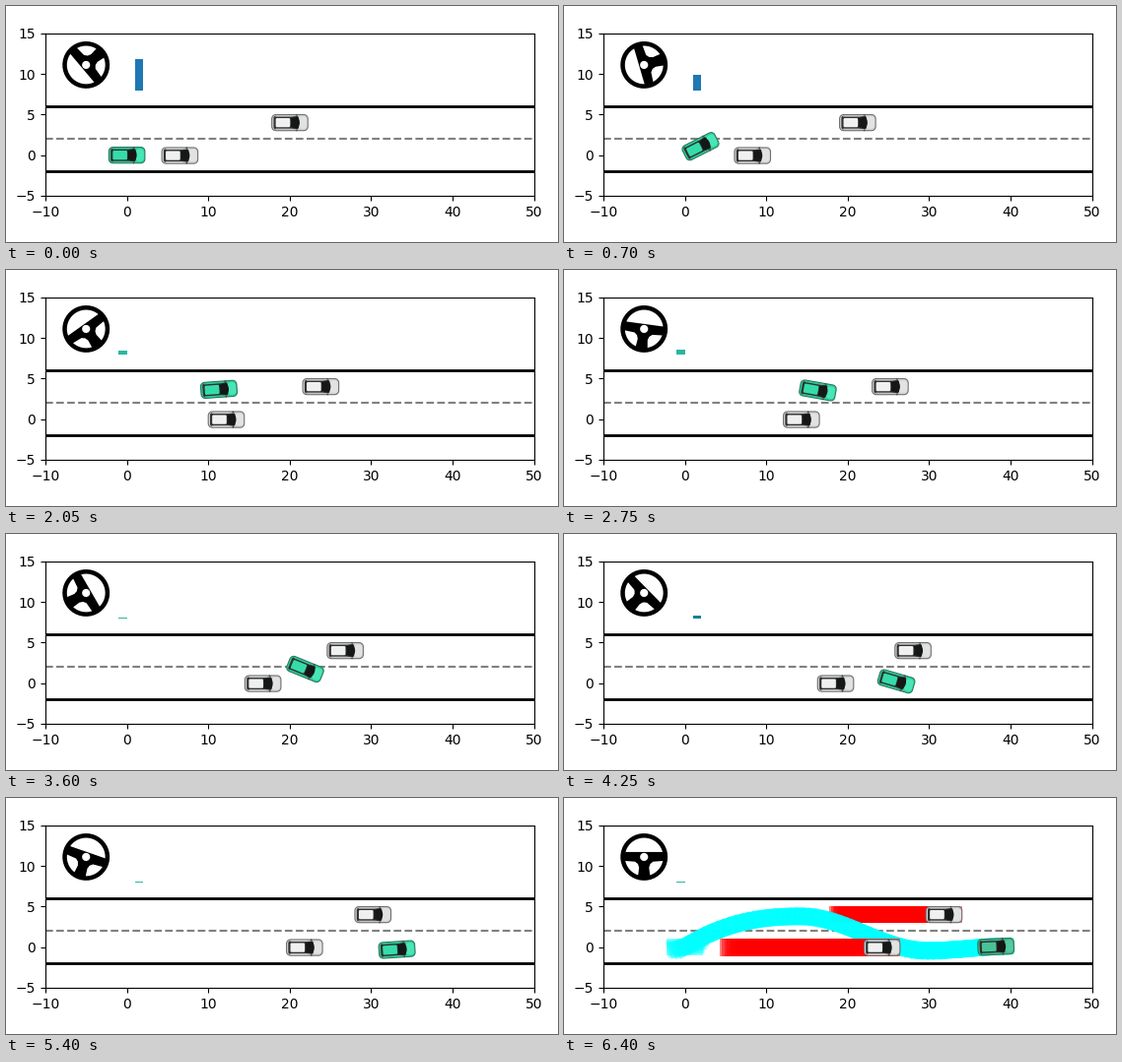
A matplotlib script for the animation above (7900 ms loop, 560 by 240 pixels).

```python
import numpy as np
import matplotlib.pyplot as plt
from matplotlib.animation import FuncAnimation
from matplotlib.patches import Polygon, Rectangle

W, H, TICK, LOOP = 560, 240, 50, 7900
LENGTH, WIDTH = 4.5, 2.1
LAST = 59          # last moving step; the next one adds the trails
RAMP = 12          # steps spent speeding up

# Steps are 100 ms long, some of them 50 ms longer.
LONG_STEPS = (0, 3, 14, 28, 39, 47, 53, 57)
STARTS = [100 * i + 50 * sum(k < i for k in LONG_STEPS) for i in range(LAST + 2)]


def ease(u):
    return .5 - .5 * np.cos(np.pi * np.clip(u, 0, 1))


def travel(step):
    """Speed up along a parabola, then slow down evenly."""
    u = min(step / RAMP, 1)
    cruise = max(step - RAMP, 0)
    return 9.22 * (u**2 - u**3 / 3) + .745 * cruise - .00135 * cruise**2


def route(x):
    """Climb into the upper lane, sink back and settle."""
    if x < 14:
        return 3.75 * (1 - (1 - x / 14)**2.3)
    return 3.75 - 4.15 * ease((x - 14) / 16) + .5 * ease((x - 30) / 10)


def steering(step):
    return 130 - 190 * min(step / 34, 1)**1.2 + 60 * max(step - 34, 0) / 25


def acceleration(step):
    if step < RAMP:
        return 3.87 * (1 - step / RAMP)
    return np.interp(step, (RAMP, 26, 36, 45, 52), (-.3, -.6, 0, .6, 0))


def ego_pose(step):
    x = travel(step)
    slope = (route(x + .01) - route(x - .01)) / .02
    return x, route(x), np.arctan(slope) * min(step / 4, 1)


def lower_pose(step):
    return 6.5 + .3 * step, -.05, 0


def upper_pose(step):
    return 20 + .2 * step, 4, 0


def place(points, pose):
    x, y, angle = pose
    c, s = np.cos(angle), np.sin(angle)
    return np.asarray(points) @ np.array([[c, s], [-s, c]]) + (x, y)


def arc(a, b, r=1.0, center=(0, 0), n=40):
    t = np.radians(np.linspace(a, b, n))
    return np.column_stack([center[0] + r * np.cos(t), center[1] + r * np.sin(t)])


def rounded(x0, x1, half, r):
    corners = ((x1 - r, half - r), (x0 + r, half - r),
               (x0 + r, r - half), (x1 - r, r - half))
    return np.vstack([arc(90 * k, 90 * k + 90, r, c, 8) for k, c in enumerate(corners)])


fig = plt.figure(figsize=(W / 100, H / 100), dpi=100)
ax = fig.add_axes([39.9 / W, 47 / H, 495.9 / W, 165.3 / H])
ax.set(xlim=(-10, 50), ylim=(-5, 15), xticks=range(-10, 51, 10), yticks=range(-5, 16, 5))
for edge in (-2, 6):
    ax.plot([-10, 50], [edge, edge], color="black", lw=2, zorder=1)
ax.plot([-10, 50], [2, 2], color="gray", ls="--", zorder=1)

moving = []


def shape(points, color, pose=(0, 0, 0), edge="none", lw=0, alpha=None, z=3):
    patch = Polygon(place(points, pose), closed=True, fc=color, ec=edge,
                    lw=lw, alpha=alpha, zorder=z)
    moving.append(ax.add_patch(patch))


def draw_car(pose, body, roof, hood, edge):
    mirror = np.array([(.65, .85), (.85, 1.08), (1, .85)])
    pillar = np.array([(-1.8, .73), (.2, .73), (.8, .8), (.8, .87), (-1.6, .87)])
    shape(rounded(-2.2, 2.22, .98, .5), body, pose, edge, .8)
    shape(rounded(1.1, 2.1, .75, .4), hood, pose)
    shape(rounded(-1.98, 1.1, .82, .25), "#2e3130", pose)
    for side in ((1, 1), (1, -1)):
        shape(mirror * side, "#444444", pose)
        shape(pillar * side, body, pose)
    shape(rounded(-1.72, .05, .56, .15), roof, pose)
    glass = np.vstack([arc(-40, 40, 1.15, (.07, 0)), [(.1, .54), (.18, 0), (.1, -.54)]])
    shape(glass, "#151817", pose)


def draw_wheel(degrees):
    pose = (-5, 11.1, np.radians(degrees))
    size = 2.9
    lobe = np.vstack([arc(192, 252, .81), [(-.21, -.45), (-.26, -.3), (-.38, -.2)]])
    shape(size * arc(0, 360), "black", pose)
    shape(size * arc(15, 165, .81), "white", pose)
    shape(size * lobe, "white", pose)
    shape(size * lobe * (-1, 1), "white", pose)
    shape(size * arc(0, 360, .17), "white", pose)


def draw_pedal(accel):
    """Throttle grows on the right, brake on the left."""
    x = 1 if accel > 0 else -1
    color = "#1f77b4" if accel > 1 else "#1a8093" if accel > .1 else "#2cb5a0"
    height = max(abs(accel), .12)
    moving.append(ax.add_patch(Rectangle((x, 8), 1, height, fc=color, lw=0)))


def draw_trails():
    half_l, half_w = LENGTH / 2, WIDTH / 2
    box = [(-half_l, -half_w), (half_l, -half_w), (half_l, half_w), (-half_l, half_w)]
    for step in range(LAST + 1):
        for pose, color in ((lower_pose(step), "red"), (upper_pose(step), "red"),
                            (ego_pose(step), "cyan")):
            shape(box, color, pose, alpha=.5, z=2)


def update(frame):
    while moving:
        moving.pop().remove()
    index = np.searchsorted(STARTS, frame * TICK, side="right") - 1
    step = min(index, LAST)
    finished = index > LAST
    draw_wheel(steering(step))
    draw_pedal(-.01 if finished else acceleration(step))
    if finished:
        draw_trails()
    for pose in (lower_pose(step), upper_pose(step)):
        draw_car(pose, "#d4d4d4", "#f0f0f0", "#e2e2e2", "#707070")
    green = ("#3fb58a", "#48c398", "#55c9a0") if finished else ("#2fcf9c", "#35dcaa", "#48e6b6")
    draw_car(ego_pose(step), *green, "#2a7a60")
    return moving


anim = FuncAnimation(fig, update, frames=LOOP // TICK, interval=TICK,
                     init_func=lambda: [], repeat=True, repeat_delay=0, blit=False)
plt.show()
```
